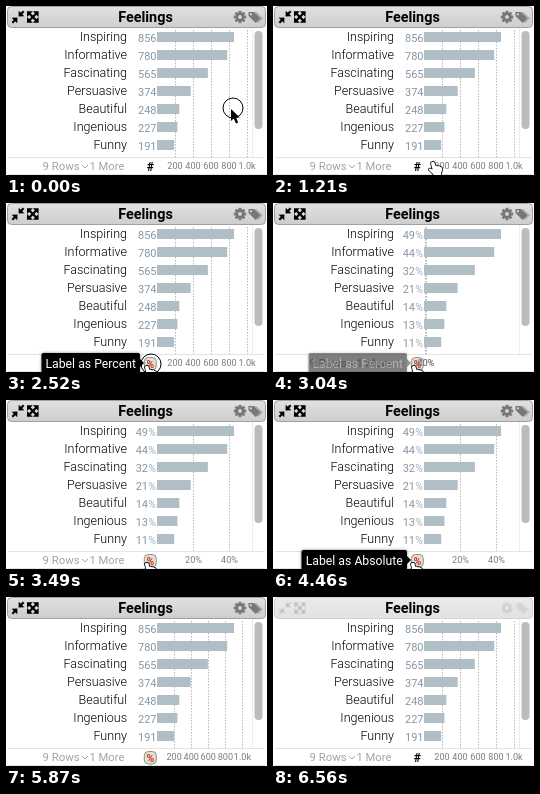
An HTML page with a canvas for the animation above (6.86 s loop, 261 by 169 pixels).

```html
<!DOCTYPE html>
<html lang="en">
<head>
<meta charset="utf-8">
<title>Feelings</title>
<style>
html, body { margin: 0; width: 100%; height: 100%; overflow: hidden; background: #fff; }
canvas { display: block; }
</style>
</head>
<body>
<canvas id="stage" width="261" height="169"></canvas>
<script>
const c = document.getElementById('stage').getContext('2d');
const LOOP = 6860, X0 = 151;
const rows = [
  ['Inspiring', 856, 49], ['Informative', 780, 44], ['Fascinating', 565, 32],
  ['Persuasive', 374, 21], ['Beautiful', 248, 14], ['Ingenious', 227, 13], ['Funny', 191, 11]
];
const absTicks = [['200', 18], ['400', 36], ['600', 54], ['800', 72], ['1.0k', 90]];
const pctTicks = [['20%', 36.5], ['40%', 72.5]];

// Pointer tip: time, x, y
const path = [
  [0, 225, 103], [60, 225, 103], [520, 211, 109], [760, 211, 109], [1210, 160, 156],
  [1390, 141, 163], [3490, 141, 163], [3660, 133, 163], [4059, 133, 163], [4060, 132, 163],
  [4290, 132, 163], [4350, 140, 163], [5700, 140, 163], [5950, 146, 172]
];

const ramp = (t, a, b) => Math.min(1, Math.max(0, (t - a) / (b - a)));
const ease = p => p < .5 ? 4 * p ** 3 : 1 - 4 * (1 - p) ** 3;
const smooth = p => p * p * (3 - 2 * p);

function text(s, x, y, size, color, align = 'left', weight = 400) {
  c.font = `${weight} ${size}px Roboto, sans-serif`;
  c.fillStyle = color;
  c.textAlign = align;
  c.fillText(s, x, y);
}

function box(x, y, w, h, r, fill, stroke) {
  c.beginPath();
  c.roundRect(x, y, w, h, r);
  c.fillStyle = fill;
  c.fill();
  if (stroke) { c.strokeStyle = stroke; c.lineWidth = 1; c.stroke(); }
}

function circle(x, y, r, fill, stroke, width = 1) {
  c.beginPath();
  c.arc(x, y, r, 0, 7);
  if (fill) { c.fillStyle = fill; c.fill(); }
  if (stroke) { c.strokeStyle = stroke; c.lineWidth = width; c.stroke(); }
}

function poly(x, y, pts, fill) {
  c.beginPath();
  for (let i = 0; i < pts.length; i += 2) c.lineTo(x + pts[i], y + pts[i + 1]);
  c.closePath();
  c.fillStyle = fill;
  c.fill();
}

// Arrow along +x, turned by a quarter-turn multiple plus 45 degrees
function diagonal(x, y, quarter, from, to, back) {
  c.save();
  c.translate(x, y);
  c.rotate((quarter + .5) * Math.PI / 2);
  c.fillStyle = '#000';
  c.fillRect(from, -1.1, to - from, 2.2);
  poly(0, 0, back ? [from - 2, 0, from + 2.2, -4, from + 2.2, 4] : [to + 2, 0, to - 2.2, -4, to - 2.2, 4], '#000');
  c.restore();
}

function gear(x, y) {
  c.fillStyle = '#777';
  for (let i = 0; i < 8; i++) {
    c.save();
    c.translate(x, y);
    c.rotate(i * Math.PI / 4);
    c.fillRect(-1.4, -6.2, 2.8, 4);
    c.restore();
  }
  circle(x, y, 3.3, null, '#777', 2.8);
}

function tags(x, y) {
  for (const dx of [2.6, 0]) {
    poly(x + dx, y, [-7, -5, -2, -5, 4.8, 1.2, .2, 6, -7, -1], dx ? '#aaa' : '#777');
  }
  circle(x - 4.6, y - 2.7, 1.1, '#ddd');
}

function header(t) {
  const calm = ramp(t, 5950, 6100);
  const g = c.createLinearGradient(0, 1, 0, 21);
  const grey = v => `rgb(${v},${v},${v})`;
  g.addColorStop(0, grey(224 + 10 * calm));
  g.addColorStop(1, grey(206 + 20 * calm));
  box(1.5, .5, 258, 21, 4, g, grey(160 + 50 * calm));
  text('Feelings', 139.5, 16, 14.4, '#000', 'center', 700);
  c.globalAlpha = 1 - .9 * ramp(t, 6160, 6560);
  for (const q of [1, 3]) diagonal(12, 11, q, 2.8, 8, true);
  for (let q = 0; q < 4; q++) diagonal(26.8, 11, q, 0, 6.3);
  gear(234, 11);
  tags(249.5, 11);
  c.globalAlpha = 1;
}

function chart(t) {
  const pct = t >= 2690 && t < 5220;
  let spread = 1;
  if (pct) spread = ease(ramp(t, 2980, 3480));
  else if (t >= 5220) spread = ease(ramp(t, 5450, 6000));
  const ticks = (pct ? pctTicks : absTicks).map(([s, d]) => [s, X0 + 1.5 + (d - 1.5) * spread]);

  c.strokeStyle = '#b8b8b8';
  c.lineWidth = 1;
  c.setLineDash([1.5, 1.5]);
  for (const [, x] of ticks) {
    const gx = Math.round(x - .5) + .5;
    c.beginPath();
    c.moveTo(gx, 24);
    c.lineTo(gx, 151);
    c.stroke();
  }
  c.setLineDash([]);

  rows.forEach(([name, count, share], i) => {
    const y = 26 + 18 * i;
    text(name, 121, y + 9.2, 12.55, '#000', 'right', 300);
    text(pct ? share : count, pct ? 142 : 150.5, y + 10, 11, '#8796a4', 'right');
    if (pct) text('%', 142.3, y + 10, 10.5, '#a6b2bc', 'left');
    c.fillStyle = '#b0bec5';
    c.fillRect(X0, y, count * .09, 10);
  });
  c.fillStyle = '#ececec';
  c.fillRect(246, 22, 1, 129);
  box(248.5, 25, 8, 98, 4, '#bcbcbc');

  c.fillStyle = '#e4e4e4';
  c.fillRect(2, 151, 257, 1);
  c.fillRect(2, 168, 257, 1);
  text('9 Rows', 36.5, 164, 11.4, '#a3a3a3');
  text('1 More', 83.5, 164, 11.2, '#a3a3a3');
  c.strokeStyle = '#a3a3a3';
  c.beginPath();
  c.moveTo(76, 159);
  c.lineTo(79, 162);
  c.lineTo(82, 159);
  c.stroke();
  return ticks;
}

function unitButton(t) {
  const x = 144.3, y = 160.5;
  const first = ramp(t, 1390, 1600) - ramp(t, 3710, 3880);
  const hover = first + ramp(t, 4290, 4460) - ramp(t, 5950, 6100);
  c.globalAlpha = hover;
  box(x - 6, y - 6, 12, 12.5, 4, '#dfe1d3', '#8d9186');
  c.globalAlpha = 1;
  const percent = t >= 1450 && t < 6000;
  const red = Math.round(215 * hover);
  text(percent ? '%' : '#', x, y + 4, percent ? 10.5 : 12, `rgb(${red},${red * .25},${red * .18})`, 'center', 700);
}

function tip(s, left, alpha) {
  if (alpha <= 0) return;
  c.save();
  c.globalAlpha = alpha;
  c.shadowColor = 'rgba(0,0,0,.5)';
  c.shadowBlur = 3;
  box(left, 150, 134 - left, 20, 2, '#000');
  c.shadowBlur = 0;
  poly(134, 160, [0, -4, 4, 0, 0, 4], '#000');
  text(s, (left + 134) / 2, 164.5, 12.25, '#fff', 'center');
  c.restore();
}

function tips(t) {
  tip('Label as Percent', 35.5, ramp(t, 1450, 1680) - .2 * ramp(t, 2630, 2690) - .8 * ramp(t, 2980, 3100));
  tip('Label as Absolute', 28.5, t < 5450 ? ramp(t, 4250, 4460) - .2 * ramp(t, 5160, 5220) : 0);
}

function ring(x, y, alpha) {
  c.globalAlpha = alpha;
  circle(x, y, 10, null, '#000');
  c.globalAlpha = 1;
}

function pointer(t) {
  if (t >= 5950) return;
  const i = path.findIndex(p => p[0] > t);
  const [a, b] = [path[i - 1], path[i]];
  const p = smooth(ramp(t, a[0], b[0]));
  const x = a[1] + (b[1] - a[1]) * p, y = a[2] + (b[2] - a[2]) * p;
  const hand = y > 152;
  const shape = new Path2D(hand
    ? 'M-1 0Q1 -1 1.6 1L2.6 4Q4 3 5 4.4Q6.6 3.6 7.2 5Q8.8 4.6 9 6.4Q9.4 9 8 11V13.5H1.2Q-1 10.5 -3.8 8.4Q-4.6 6.4 -2.6 6.6L-.4 7.6L-2 1.4Q-2.2 .4 -1 0Z'
    : 'M0 0V12L2.8 9.4L5 14.4L7.2 13.4L5 8.6H8.8Z');
  c.save();
  c.translate(x, y);
  c.lineJoin = 'round';
  c.lineWidth = hand ? 1.6 : 1.6;
  c.strokeStyle = hand ? '#000' : '#fff';
  c.fillStyle = hand ? '#fff' : '#000';
  c.stroke(shape);
  c.fill(shape);
  c.restore();
}

function draw(t) {
  c.fillStyle = '#fff';
  c.fillRect(0, 0, 261, 169);
  header(t);
  const ticks = chart(t);
  unitButton(t);
  for (const [s, x] of ticks) text(s, x, 163, 9.1, '#7c7c7c', 'center');
  tips(t);
  pointer(t);
  if (t < 180) ring(227, 102, 1 - ramp(t, 60, 180));
  if (t >= 2520 && t < 2690) ring(145, 161, 1 - ramp(t, 2630, 2690));
  if (t >= 5050 && t < 5220) ring(145, 161, 1 - ramp(t, 5160, 5220));
}

function tick() {
  draw(performance.now() % LOOP);
  requestAnimationFrame(tick);
}
tick();
</script>
</body>
</html>
```
